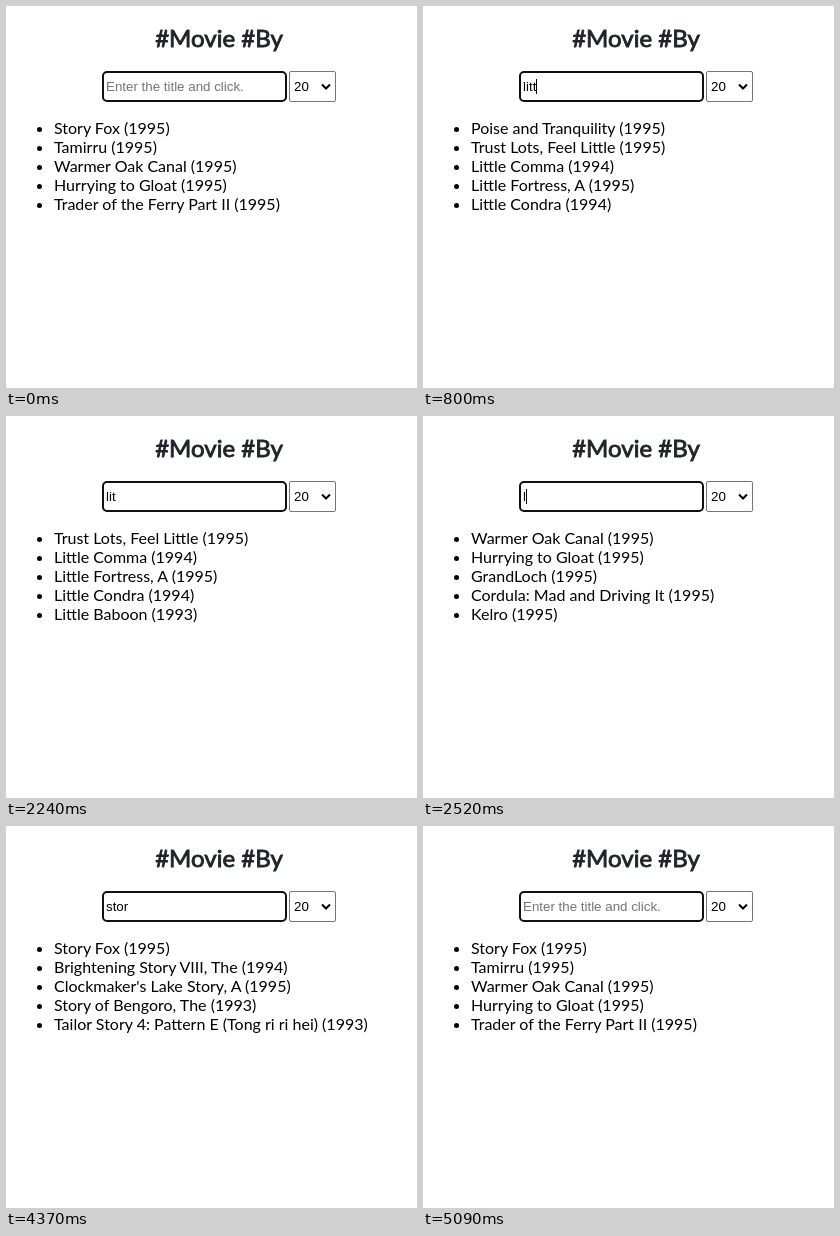
An HTML page that plays this animation: 411 by 382 pixels, repeating every 5390 ms.

```html
<!DOCTYPE html>
<html lang="en">
<head>
<meta charset="utf-8">
<title>Movie search</title>
<style>
  html, body { margin: 0; width: 100%; height: 100%; overflow: hidden; background: #fff; }
  body { position: relative; font: 16px/19px Lato, sans-serif; color: #000; }
  h1, ul, .field, .count { position: absolute; margin: 0; box-sizing: border-box; }
  /* Regular weight thickened by a stroke, like a browser's synthetic bold */
  h1 {
    left: 13px; top: 17px; width: 400px; text-align: center;
    font-size: 24px; font-weight: 400; line-height: 29px;
    color: #20232a; -webkit-text-stroke: 0.86px #20232a;
  }
  .field, .count {
    top: 65px; height: 31px; white-space: pre;
    font: 13.3333px/15px Arial, "Liberation Sans", sans-serif;
  }
  .field { left: 96px; width: 185px; padding: 6px 2px; border: 2px solid #101010; border-radius: 5px; }
  .field.empty { color: #757575; }
  .caret { display: inline-block; width: 1px; height: 15px; vertical-align: top; background: #000; }
  .count { left: 283px; width: 47px; padding: 7px 4px; border: 1px solid #767676; border-radius: 2px; }
  .count svg { position: absolute; left: 31px; top: 11px; }
  ul { left: 8px; top: 112px; padding: 0 0 0 40px; white-space: nowrap; }
</style>
</head>
<body>
<h1>#Movie #By</h1>
<div class="field"><span id="text"></span><span class="caret" id="caret"></span></div>
<div class="count">20<svg width="10" height="8"><path d="M1 1.5L5 5.5L9 1.5" fill="none" stroke="#000" stroke-width="2"/></svg></div>
<ul id="list"></ul>
<script>
const LOOP = 5390;
const ROWS = 5;
const HINT = "Enter the title and click.";

const movies = [
  "Story Fox (1995)",
  "Tamirru (1995)",
  "Warmer Oak Canal (1995)",
  "Hurrying to Gloat (1995)",
  "Trader of the Ferry Part II (1995)",
  "GrandLoch (1995)",
  "Cordula: Mad and Driving It (1995)",
  "Kelro (1995)",
  "Valiant Harbor and the Copper Ferry (1995)",
  "Poise and Tranquility (1995)",
  "Trust Lots, Feel Little (1995)",
  "Storm Ferry (1995)",
  "Stopper Hides Out (1996)",
  "Castaway Orchard and Birch (1995)",
  "Little Comma (1994)",
  "Little Fortress, A (1995)",
  "Little Condra (1994)",
  "Brightening Story VIII, The (1994)",
  "Clockmaker's Lake Story, A (1995)",
  "Story of Bengoro, The (1993)",
  "Little Baboon (1993)",
  "Tailor Story 4: Pattern E (Tong ri ri hei) (1993)"
];

// Each track holds [start ms, value]; results lag behind the typing.
const typed = [
  [0, ""], [290, "l"], [440, "li"], [590, "lit"], [800, "litt"], [950, "littl"], [1100, "little"],
  [1880, "littl"], [2030, "litt"], [2180, "lit"], [2320, "li"], [2450, "l"], [2590, ""],
  [2880, "s"], [3020, "st"], [3170, "sto"], [3310, "stor"], [3440, "story"],
  [4370, "stor"], [4520, "sto"], [4660, "st"], [4800, "s"], [5020, ""]
];
const searched = [
  [0, ""], [510, "l"], [660, "li"], [730, "lit"], [950, "litt"],
  [2250, "lit"], [2390, "li"], [2520, "l"], [2660, ""],
  [2950, "s"], [3090, "st"], [3240, "sto"], [3660, "story"],
  [4450, "stor"], [4590, "sto"], [4730, "st"], [4950, "s"], [5090, ""]
];
const caretOn = [
  [0, false], [290, true], [1600, false], [2520, true], [2590, false],
  [2880, true], [4020, false], [4660, true], [5020, false]
];

const field = document.querySelector(".field");
const text = document.getElementById("text");
const caret = document.getElementById("caret");
const list = document.getElementById("list");

const valueAt = (track, t) => track.findLast(([start]) => start <= t)[1];

const search = query =>
  movies.filter(title => title.toLowerCase().includes(query)).slice(0, ROWS);

let shownQuery = null;

function showResults(query) {
  if (query === shownQuery) return;
  shownQuery = query;
  list.replaceChildren(...search(query).map(title => {
    const item = document.createElement("li");
    item.textContent = title;
    return item;
  }));
}

function draw(now) {
  const t = now % LOOP;
  const input = valueAt(typed, t);
  const label = input || HINT;
  if (text.textContent !== label) text.textContent = label;
  field.classList.toggle("empty", !input);
  caret.style.visibility = valueAt(caretOn, t) ? "visible" : "hidden";
  showResults(valueAt(searched, t));
}

const begin = performance.now();
function tick() {
  draw(performance.now() - begin);
  requestAnimationFrame(tick);
}
tick();
</script>
</body>
</html>
```
